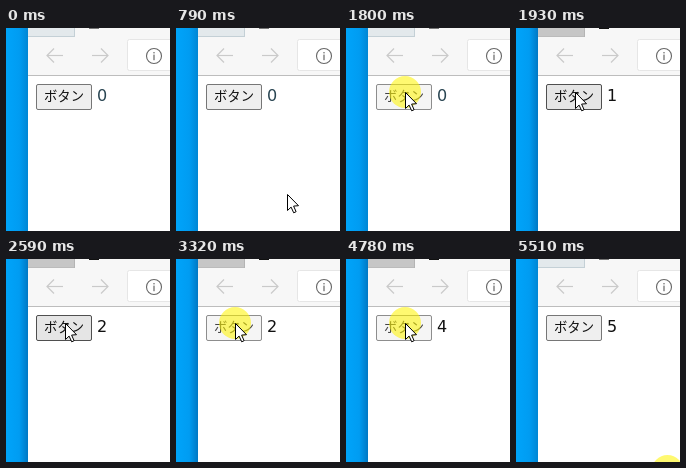
These frames come from a looping animation (164x203 px, 5.58 s). An HTML page with a canvas:

```html
<!DOCTYPE html>
<html lang="ja">
<head>
<meta charset="utf-8">
<title>Click counter</title>
<style>
html, body { margin: 0; width: 100%; height: 100%; overflow: hidden; background: #fff; }
canvas { display: block; }
</style>
</head>
<body>
<canvas id="stage" width="164" height="203"></canvas>
<script>
const ctx = document.getElementById('stage').getContext('2d');
const LOOP = 5580;
const presses = [[1800, 1930], [2460, 2590], [3320, 3450], [4050, 4190], [4780, 4850]];
const REST = { x: 59, y: 64 };

function rect(x, y, w, h, color) {
  ctx.fillStyle = color;
  ctx.fillRect(x, y, w, h);
}

function line(color, width, ...points) {
  ctx.beginPath();
  points.forEach(([x, y], i) => i ? ctx.lineTo(x, y) : ctx.moveTo(x, y));
  ctx.strokeStyle = color;
  ctx.lineWidth = width;
  ctx.stroke();
}

function box(x, y, w, h, r, fill, stroke) {
  ctx.beginPath();
  ctx.roundRect(x + 0.5, y + 0.5, w - 1, h - 1, r);
  ctx.fillStyle = fill;
  ctx.fill();
  ctx.strokeStyle = stroke;
  ctx.lineWidth = 1;
  ctx.stroke();
}

function text(str, x, y, font, color) {
  ctx.font = font;
  ctx.fillStyle = color;
  ctx.fillText(str, x, y);
}

function drawArrow(x, dir) {
  const tip = x + dir * 8;
  line('#cacaca', 1.2, [x - dir * 8, 27.5], [tip, 27.5]);
  line('#cacaca', 1.2, [tip - dir * 7, 20.5], [tip, 27.5], [tip - dir * 7, 34.5]);
}

function drawWindow(active) {
  const sky = ctx.createLinearGradient(0, 0, 22, 0);
  sky.addColorStop(0, '#00a4fa');
  sky.addColorStop(0.6, '#009cf2');
  sky.addColorStop(1, active ? '#0078c4' : '#0086d4');
  rect(0, 0, 22, 203, sky);
  rect(22, 0, 142, 203, '#fff');
  rect(22, 0, 142, 47, '#f7f7f7');
  rect(22, 0, 47, 9, active ? '#c6c6c6' : '#e3e9ec');
  rect(22, 8, 47, 1, active ? '#bbbbbb' : '#c4d0d6');
  rect(68, 0, 1, 9, active ? '#b4b4b4' : '#c4d0d6');
  rect(83, 0, 10, 1, active ? '#111' : '#777');
  rect(22, 47, 142, 1, '#bdbdbd');
  drawArrow(49, -1);
  drawArrow(94, 1);
  box(121, 11, 60, 32, 2, '#fff', '#e6e6e6');
  ctx.beginPath();
  ctx.arc(148, 28, 7.5, 0, Math.PI * 2);
  ctx.strokeStyle = '#666';
  ctx.lineWidth = 1.1;
  ctx.stroke();
  rect(147.4, 24, 1.2, 1.4, '#666');
  rect(147.4, 26.6, 1.2, 5.6, '#666');
}

function drawButton(hover, pressed) {
  const fill = pressed ? '#f5f5f5' : hover ? '#e5e5e5' : '#efefef';
  const edge = pressed ? '#8d8d8d' : hover ? '#4f4f4f' : '#767676';
  box(30, 56, 56, 26, 1.5, fill, edge);
  text('ボタン', 38, 73, '13.333px "Noto Sans CJK JP", "Noto Sans CJK", sans-serif',
    pressed ? '#444' : '#111');
}

function drawGlow(x, y) {
  ctx.beginPath();
  ctx.arc(x, y, 16, 0, Math.PI * 2);
  ctx.fillStyle = 'rgba(255, 244, 0, 0.56)';
  ctx.fill();
}

function drawCursor({ x, y }) {
  ctx.save();
  ctx.translate(Math.round(x) + 0.5, Math.round(y) + 0.5);
  ctx.beginPath();
  ctx.moveTo(0, 0);
  ctx.lineTo(0, 16);
  ctx.lineTo(3.6, 12.6);
  ctx.lineTo(6.2, 18.3);
  ctx.lineTo(8.6, 17.2);
  ctx.lineTo(6.1, 11.6);
  ctx.lineTo(11, 11.2);
  ctx.closePath();
  ctx.fillStyle = '#fff';
  ctx.fill();
  ctx.strokeStyle = '#000';
  ctx.lineWidth = 1;
  ctx.stroke();
  ctx.restore();
}

function cursorAt(t) {
  if (t < 720 || t >= 5050) return null;
  if (t >= 4990) return { x: 97, y: 181 };
  const step = Math.min(8, Math.floor((t - 720) / 68.75 + 0.12));
  const left = 1 - step / 8;
  return { x: REST.x + 75 * left ** 2.76, y: REST.y + 132 * left ** 1.93 };
}

function draw(t) {
  const cursor = cursorAt(t);
  const pressed = presses.some(([down, up]) => t >= down && t < up);
  const count = presses.filter(([, up]) => t >= up).length;
  const hover = cursor !== null && cursor.y < 82;

  drawWindow(t >= 1860 && t < 5510);
  drawButton(hover, pressed);
  text(count, 91, 73, '16px "DejaVu Sans", sans-serif', count ? '#111' : '#294552');
  if (pressed) drawGlow(REST.x, REST.y);
  if (t >= 5510) drawGlow(151.5, 212);
  if (cursor) drawCursor(cursor);
}

const start = performance.now();
function tick() {
  draw((performance.now() - start) % LOOP);
  requestAnimationFrame(tick);
}
tick();
</script>
</body>
</html>
```
